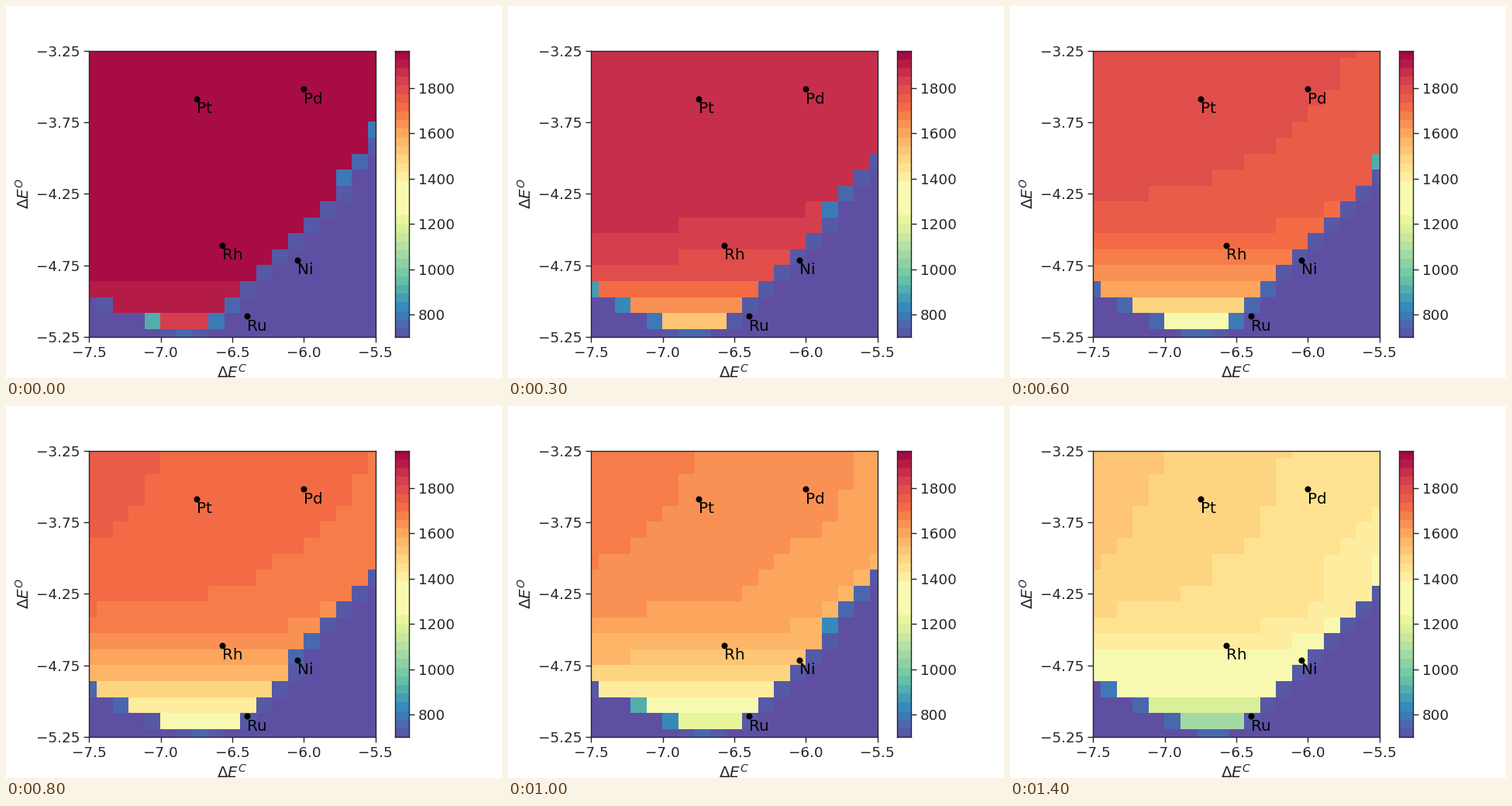
Write a matplotlib script that moves like this. It is 640x480 px and loops after 1500 ms.

```python
import matplotlib as mpl
import matplotlib.pyplot as plt
import numpy as np
from matplotlib.animation import FuncAnimation

INK = "0.15"
plt.rcParams.update({
    "font.family": "DejaVu Sans", "font.size": 14.4,
    "axes.labelsize": 14.4, "axes.linewidth": 1.0,
    "axes.edgecolor": INK, "axes.labelcolor": INK,
    "xtick.labelsize": 13.2, "ytick.labelsize": 13.2,
    "xtick.color": INK, "ytick.color": INK,
    "xtick.major.size": 4.8, "ytick.major.size": 4.8,
    "xtick.major.width": 1.0, "ytick.major.width": 1.0,
})

W, H, N, FRAMES = 640, 480, 19, 15
T_MIN, T_MAX = 700, 1966
T_COLD = 722

METALS = {
    "Pt": (-6.750, -3.586), "Pd": (-6.000, -3.519), "Rh": (-6.570, -4.610),
    "Ni": (-6.045, -4.711), "Ru": (-6.397, -5.104),
}

# Colour bands: even steps, one wide pale band, split ends
edges = np.delete(np.linspace(T_MIN, T_MAX, 34), [15, 16, 17])
edges = np.sort(np.append(edges, [712, 1951]))


def band_color(low, high):
    span = (np.linspace(low, high, 15) - T_MIN) / (T_MAX - T_MIN)
    return mpl.colormaps["Spectral_r"](span).mean(axis=0)


colors = np.array([band_color(a, b) for a, b in zip(edges[:-1], edges[1:])])
colors[0] = mpl.colormaps["Spectral_r"](0)


def advance_rows(k):
    """Rows from which the ignited diagonal reaches one cell further."""
    amp = np.array([6, 9, 17.15, 31.1])
    decay = np.array([4, 7, 6.7, 10])
    return amp * np.exp(-k / decay)


def hot_field(k, i, j, reach):
    """Temperatures as if every cell were ignited."""
    top = 1949 - 18 * k - 0.85 * k ** 2
    fall = 485 - 370 * np.exp(-k / 3)
    length = 3.4 - 1.9 * np.exp(-k / 3.5)
    tilt = 6.3 * k
    slope = tilt * i / 18 * np.clip((13 - j) / 6, 0, 1)
    gap = np.maximum(reach - i - j, 0)
    rim = 0.4 * tilt * np.exp(-gap / 2) * np.clip((15 - j) / 3, 0, 1)
    return top - fall * np.exp((j - 17) / length) - slope - rim


def field(k):
    cols = np.arange(N)
    steps = advance_rows(k)
    temp = np.full((N, N), float(T_MIN))
    for j in range(N - 1):
        reach = 22 + np.sum(j >= steps)
        last = min(reach - j, N - 1)
        limit = max(0, 2.12 * (j - 15) - 0.2 + 0.115 * k)
        first = int(np.ceil(limit))
        temp[j, first:last + 1] = hot_field(k, cols, j, reach)[first:last + 1]

        # Cells about to ignite, or just gone out, glow
        if last + 1 < N:
            wait = np.min(steps[steps > j] - j, initial=99)
            glow = 110 * (1 - j / 24) * np.exp((1 - wait) / 1.2)
            temp[j, last + 1] = T_COLD + glow
        if first:
            temp[j, first - 1] = T_COLD + 220 * np.exp(-3 * (limit - first + 1))

    # Faint warm spot under the lowest ignited row
    temp[-1] = 705 + 55 * np.exp(-(cols - 6 - 0.11 * k) ** 2)
    return temp


def paint(temp):
    band = np.searchsorted(edges, temp, side="right") - 1
    return colors[np.clip(band, 0, len(colors) - 1)]


fig = plt.figure(figsize=(W / 100, H / 100), dpi=100, facecolor="white")
side = 369.6
ax = fig.add_axes([107.2 / W, 0.11, side / W, side / H])
half = 1 / 18
image = ax.imshow(paint(field(0)), interpolation="nearest", aspect="auto",
                  extent=(-7.5 - half, -5.5 + half, -5.25 - half, -3.25 + half))
ax.set(xlim=(-7.5, -5.5), ylim=(-5.25, -3.25),
       xticks=np.arange(-7.5, -5.4, 0.5), yticks=np.arange(-5.25, -3.2, 0.5),
       xlabel=r"$\Delta E^C$", ylabel=r"$\Delta E^O$")
ax.xaxis.set_major_formatter("{x:.1f}")
ax.yaxis.set_major_formatter("{x:.2f}")

for name, (x, y) in METALS.items():
    ax.plot(x, y, "o", color="black", ms=4.8, mew=1)
    ax.text(x, y - 0.1, name, color="black")

bar = fig.add_axes([501.6 / W, 0.11, side / 20 / W, side / H])
for low, high, color in zip(edges[:-1], edges[1:], colors):
    bar.axhspan(low, high, color=color, lw=0, antialiased=False)
bar.set(xlim=(0, 1), ylim=(T_MIN, T_MAX), xticks=[], yticks=range(800, 1801, 200))
bar.yaxis.tick_right()


def draw(k):
    image.set_data(paint(field(k)))
    return [image]


anim = FuncAnimation(fig, draw, frames=FRAMES, interval=100, repeat=True)
plt.show()
```
